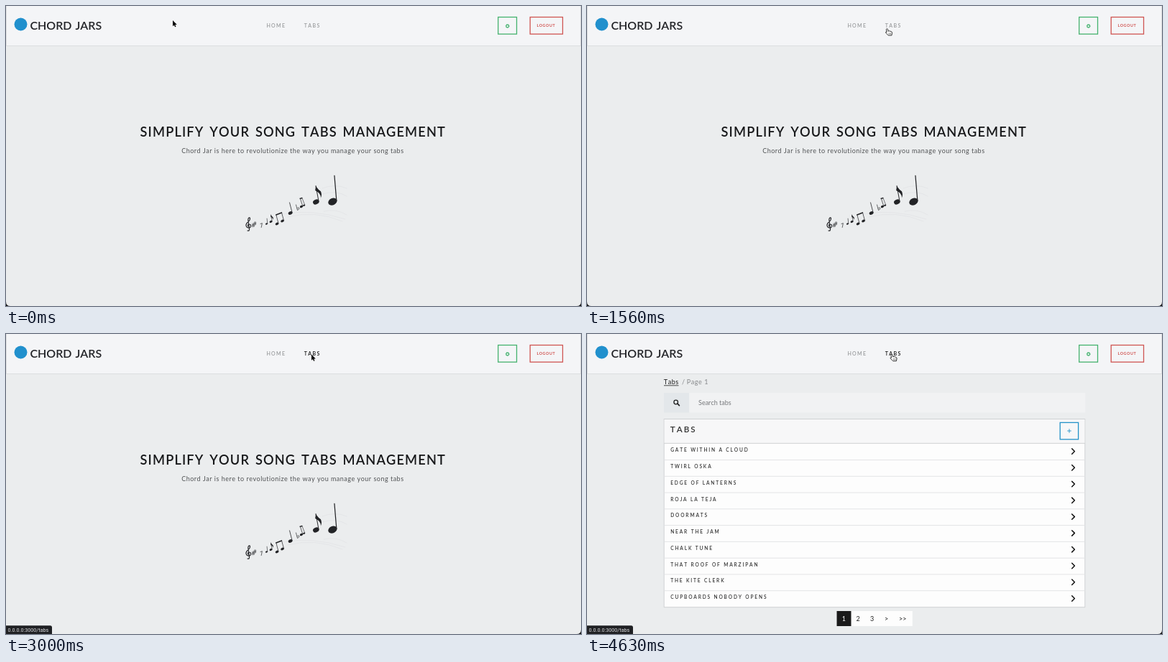
An HTML page that plays this animation: 800x418 px, repeating every 5000 ms.

```html
<!DOCTYPE html>
<html lang="en">
<head>
<meta charset="utf-8">
<title>Song tabs</title>
<style>
html, body { margin: 0; width: 100%; height: 100%; overflow: hidden; background: #ebedee; }
svg { display: block; width: 800px; height: 418px; }
text { font-family: Lato, "Open Sans", sans-serif; font-kerning: none; white-space: pre; }
.brand { font-size: 16px; font-weight: 600; word-spacing: 1px; fill: #222327; }
.nav { font-size: 7px; font-weight: 600; letter-spacing: 1.35px; fill: #999b9d; }
.logout { font-size: 5.3px; font-weight: 700; letter-spacing: .6px; fill: #cf4f4c; }
.title { font-size: 18.2px; font-weight: 600; letter-spacing: 1.15px; word-spacing: 2.1px; fill: #17181a; }
.sub { font-size: 9px; letter-spacing: .5px; fill: #505254; }
.crumb { font-size: 9px; letter-spacing: .58px; fill: #85878a; }
.crumb .link { fill: #1a1a1a; }
.search { font-size: 9px; fill: #77797c; }
.head { font-size: 11.6px; font-weight: 600; letter-spacing: 2px; fill: #333; }
.row { font-size: 6.6px; font-weight: 600; letter-spacing: 1.85px; fill: #333; }
.page { font-size: 9px; text-anchor: middle; fill: #222; }
.status { font: 7.2px Roboto, sans-serif; fill: #dcdde0; }
.button { fill: none; stroke-width: 1.3; }
.line { fill: none; stroke-linecap: round; stroke-linejoin: round; }
</style>
</head>
<body>
<svg viewBox="0 0 800 418">
  <rect width="800" height="418" fill="#ebedee"/>

  <rect x=".5" y="-1" width="799" height="56.5" fill="#f4f5f7" stroke="#dcdee0"/>
  <circle cx="20.5" cy="25.5" r="9" fill="#2190cd"/>
  <text class="brand" x="33.4" y="32.6">CHORD JARS</text>
  <text class="nav" x="362.4" y="29.6">HOME</text>
  <text class="nav" id="tabs" x="414.8" y="29.6">TABS</text>
  <rect class="button" x="684.7" y="15.5" width="25.8" height="23.6" stroke="#45b26e"/>
  <g fill="none" stroke="#3fb06a">
    <circle cx="697.7" cy="28" r="1.8" stroke-width="1.2"/>
    <circle cx="697.7" cy="28" r="2.6" stroke-width=".6" stroke-dasharray="1.02"/>
  </g>
  <rect class="button" x="729.2" y="15.5" width="45.3" height="23.6" stroke="#cf5552"/>
  <text class="logout" x="738.4" y="29">LOGOUT</text>

  <g id="home">
    <text class="title" x="186.5" y="182">SIMPLIFY YOUR SONG TABS MANAGEMENT</text>
    <text class="sub" x="244.2" y="205.2">Chord Jar is here to revolutionize the way you manage your song tabs</text>
    <g class="line" stroke="#e3e4e6" stroke-width=".8">
      <path d="M385 290Q425 282 472 297M392 294Q430 284 468 300M440 254Q458 247 474 254M440 262Q460 256 474 265M442 286Q460 282 474 291"/>
    </g>
    <g id="notes"></g>
    <g class="line" stroke="#28292c">
      <path stroke-width="1.2" d="M336 313Q339 314 338.5 310L336.8 298Q337 294.5 339.3 295Q340.5 298 336 301.5Q332.5 305 335 308Q338.5 310.5 340.8 307.5Q341 304 338 304Q335.5 305 337 307"/>
      <path stroke-width=".6" d="M343 303l.6 5M344.6 302.5l.6 5M342.4 305l3.2-.8M342.7 306.6l3.2-.8M345.8 301l.5 4M347 300.6l.5 4M345.3 303l2.6-.7"/>
      <path stroke-width=".7" d="M354 303.5l2.4-.8L355.2 308.5M403.5 277l2 7.5q3-1.2 2.3-3.2q-1.2-1.5-2.6.6"/>
    </g>
  </g>

  <g id="list">
    <text class="crumb" x="106.8" y="69.8"><tspan class="link">Tabs</tspan><tspan x="132">/</tspan><tspan x="138.7">Page 1</tspan></text>
    <path d="M107 71.8H127.5" stroke="#1a1a1a" stroke-width=".8"/>
    <rect x="107" y="82" width="35.3" height="27.5" fill="#e3e7ea"/>
    <rect x="142.3" y="82" width="551" height="27.5" fill="#f1f2f3"/>
    <path class="line" d="M126 97.2l2.4 2.4" stroke="#222" stroke-width="1.7"/>
    <circle cx="123.7" cy="95" r="2.8" fill="none" stroke="#222" stroke-width="1.3"/>
    <text class="search" x="155" y="98.8">Search tabs</text>
    <rect x="107.2" y="118.5" width="585.6" height="262.2" fill="#fdfdfd" stroke="#d0d2d4"/>
    <rect x="107.7" y="119" width="584.6" height="33" fill="#f7f7f8"/>
    <path d="M107 152.3H693" stroke="#cfd1d3"/>
    <text class="head" x="115.8" y="137">TABS</text>
    <rect class="button" x="658.2" y="123.4" width="25.4" height="23.4" stroke="#2492c8"/>
    <path d="M668.2 135H673.8M671 132.2V137.8" stroke="#2492c8" stroke-width=".9"/>
    <g id="rows"></g>
    <rect x="347.5" y="386" width="105.3" height="21" fill="#fdfdfd"/>
    <rect x="347.5" y="386" width="20" height="21" fill="#1a1a1a"/>
    <g id="pages"></g>
  </g>

  <path d="M0 412Q0 418 6 418H0ZM800 412Q800 418 794 418H800Z" fill="#111"/>
  <g id="status">
    <path d="M0 406.3H61.5Q64 406.3 64 409V418H0Z" fill="#1f2023"/>
    <text class="status" x="2.6" y="414.7">0.0.0.0:3000/tabs</text>
  </g>

  <g id="cursor" stroke-linejoin="round">
    <path id="arrow" d="M0 0V8.2L1.9 6.5 3.1 9.3 4.5 8.7 3.3 6H5.8Z" fill="#000" stroke="#fff" stroke-width=".7" paint-order="stroke"/>
    <g id="hand" transform="translate(-1.2 -.4) scale(.95)" fill="#fff" stroke="#111" stroke-width=".9">
      <path d="M-1 1Q0-.5 1.2.8L2 4Q4 2.8 4.4 4Q6 3.4 6.3 4.8Q7.8 4.6 7.6 6.5L7 10H2L-1.8 6Q-2 4.4-.2 5.2Z"/>
      <path d="M2.8 6.4V8.6M4.2 6.4V8.6M5.6 6.4V8.6" stroke-width=".5"/>
    </g>
  </g>
</svg>
<script>
const LOOP = 5000, MOVE_START = 440, MOVE_END = 1700, HOVER = 1590, STATUS_AT = 2000,
  CLICK = 3000, LOAD = 3060, REHOVER = 3200;
const $ = id => document.getElementById(id);
const clamp = v => Math.max(0, Math.min(1, v));
const show = (id, on) => $(id).style.display = on ? '' : 'none';

// Note head at (x, y) with radius r; the stem leans by dx and rises by h.
function note(x, y, r, dx, h, flag) {
  const sx = x + r * .85, sy = y - r * .2, tx = sx + dx, ty = sy - h;
  const tail = flag ? `<path d="M${tx} ${ty}q${h * .1} ${h * .2} ${h * .32} ${h * .36}q${h * .1} ${h * .2} 0 ${h * .42}
    q${h * .02} ${-h * .3} ${-h * .36} ${-h * .48}Z" fill="#222326"/>` : '';
  return `<ellipse cx="${x}" cy="${y}" rx="${r}" ry="${r * .74}" transform="rotate(-24 ${x} ${y})" fill="#222326"/>
    <path class="line" d="M${sx} ${sy}L${tx} ${ty}" stroke="#222326" stroke-width="${.4 + r * .13}"/>${tail}`;
}
const beam = d => `<path class="line" d="${d}" stroke="#222326" stroke-width="1.4"/>`;

$('notes').innerHTML =
  note(362.5, 303.5, 1.6, -.8, 7) +
  note(368.5, 300.5, 2, -1.6, 9, true) +
  note(377, 303.5, 2.4, -3.2, 12) + note(384.5, 299.5, 2.4, -3, 11) + beam('M375.8 291L383.5 288') +
  note(395.6, 288.5, 3, -3.6, 14) +
  note(411, 279.5, 2.2, -3.6, 11) + note(414.6, 277.8, 1.5, -4, 10) + beam('M409.2 268.3L411.8 267.5') +
  note(431.3, 273, 4.4, -4, 21.5, true) +
  note(454.4, 272.6, 6.4, -2.9, 35);

const songs = ['GATE WITHIN A CLOUD', 'TWIRL OSKA', 'EDGE OF LANTERNS', 'ROJA LA TEJA', 'DOORMATS',
  'NEAR THE JAM', 'CHALK TUNE', 'THAT ROOF OF MARZIPAN', 'THE KITE CLERK', 'CUPBOARDS NOBODY OPENS'];
$('rows').innerHTML = songs.map((song, i) => {
  const y = 22.78 * i;
  const rule = i ? `<path d="M107.7 ${152.7 + y}H692.3" stroke="#e3e4e6"/>` : '';
  return `${rule}<text class="row" x="116.2" y="${164.2 + y}">${song}</text>
    <path class="line" d="M674.7 ${159.8 + y}l3.7 3.7l-3.7 3.7" stroke="#111" stroke-width="1.5"/>`;
}).join('');

$('pages').innerHTML = [['1', 357.4], ['2', 377], ['3', 396.7], ['&gt;', 416.6], ['&gt;&gt;', 439.3]]
  .map(([label, x], i) => `<text class="page" x="${x}" y="399.6"${i ? '' : ' style="fill:#fff"'}>${label}</text>`).join('');

function draw(t) {
  const u = clamp((t - MOVE_START) / (MOVE_END - MOVE_START));
  const s = u * u * (3 - 2 * u);
  const x = 232 + 193 * s, y = 20 + 8.5 * s + 110 * s * (1 - s);
  const pointing = x > 414 && !(t >= CLICK && t < LOAD);
  const loaded = t >= LOAD;
  const hover = clamp((t - (loaded ? REHOVER : HOVER)) / 150);
  const grey = c => Math.round(c + (20 - c) * hover);

  $('cursor').setAttribute('transform', `translate(${x} ${y})`);
  show('arrow', !pointing);
  show('hand', pointing);
  show('home', !loaded);
  show('list', loaded);
  show('status', t >= STATUS_AT);
  $('tabs').style.fill = `rgb(${grey(153)},${grey(155)},${grey(157)})`;
}

const start = performance.now();
function tick() {
  draw((performance.now() - start) % LOOP);
  requestAnimationFrame(tick);
}
draw(0);
tick();
</script>
</body>
</html>
```
